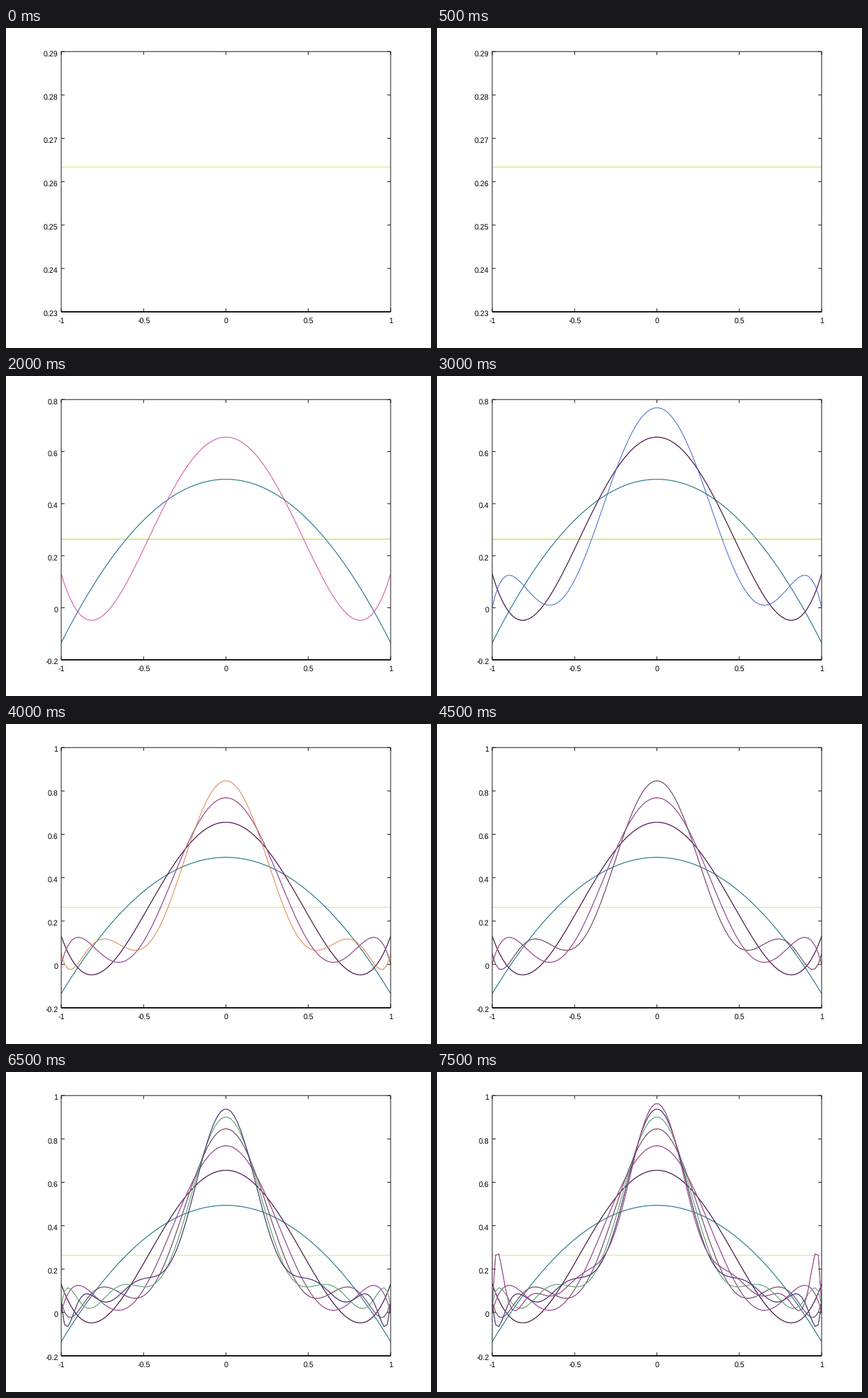
Animation of 600 by 451 pixels, one loop 8 s. Source, as a matplotlib script:

```python
import numpy as np
import matplotlib.pyplot as plt
from matplotlib.animation import FuncAnimation

# Least-squares polynomials of rising degree fitted to a bell-shaped function
W, H, DPI = 600, 451, 100
LEFT, TOP, WIDTH, HEIGHT = 78, 33.2, 465, 366.8
STEPS, INTERVAL = 16, 500
PX = 72 / DPI
TICK = 4.8
INK = "#1a1a1a"

LIME, PALE = "#d3df5e", "#e4e6bd"
COLORS = [
    LIME, PALE, "#52d68a", "#386d98", "#d0459c", "#2a1a38",
    "#3c5fc8", "#b9507f", "#d97f40", "#5f4a88", "#d0a04a", "#50b090",
    "#5a8fc0", "#4a2a5e", "#c06070", "#904a92",
]

nodes = np.linspace(-1, 1, 21)
samples = 1 / (1 + 25 * nodes**2)
xs = np.linspace(-1, 1, 100)
curves = [np.polynomial.Polynomial.fit(nodes, samples, d)(xs)
          for d in range(STEPS)]

plt.rcParams["font.family"] = "Liberation Sans"
plt.rcParams["text.hinting"] = "no_hinting"
fig = plt.figure(figsize=(W / DPI, H / DPI), dpi=DPI, facecolor="white")
ax = fig.add_axes([LEFT / W, 1 - (TOP + HEIGHT) / H, WIDTH / W, HEIGHT / H])


def y_axis(step):
    """Lower limit, upper limit and tick spacing."""
    if step < 2:
        return 0.23, 0.29, 0.01
    if step < 4:
        return -0.2, 0.5, 0.1
    if step < 8:
        return -0.2, 0.8, 0.2
    return -0.2, 1.0, 0.2


def rule(x, y):
    """Thin axis line; x and y in pixels from the lower left corner."""
    ax.plot(np.array(x) / WIDTH, np.array(y) / HEIGHT,
            transform=ax.transAxes, color=INK, lw=PX, snap=False,
            clip_on=False, solid_capstyle="butt", solid_joinstyle="miter")


def label(x, y, value, align):
    ax.text(x / WIDTH, y / HEIGHT, f"{value:g}", transform=ax.transAxes,
            ha=align, va="baseline", fontsize=10.6 * PX, color="black")


def draw_frame(lo, hi, gap):
    rule([0, WIDTH, WIDTH, 0, 0, WIDTH], [0, 0, HEIGHT, HEIGHT, 0, 0])
    for v in np.linspace(-1, 1, 5):
        x = (v + 1) / 2 * WIDTH
        rule([x, x], [0, TICK])
        rule([x, x], [HEIGHT - TICK, HEIGHT])
        label(x, -15.6, v, "center")
    count = round((hi - lo) / gap)
    for i in range(count + 1):
        y = i / count * HEIGHT
        rule([0, TICK], [y, y])
        rule([WIDTH - TICK, WIDTH], [y, y])
        label(-4.5, y - 6.2, round(lo + i * gap, 2), "right")


def draw(step):
    ax.clear()
    ax.axis("off")
    lo, hi, gap = y_axis(step)
    for degree in range(step + 1):
        color = COLORS[degree]
        if degree == 1 and 4 <= step < 8:
            color = LIME
        ax.plot(xs, curves[degree], color=color, lw=0.95 * PX, snap=False)
    draw_frame(lo, hi, gap)
    ax.set(xlim=(-1, 1), ylim=(lo, hi))
    return ax.get_children()


anim = FuncAnimation(fig, draw, frames=STEPS, interval=INTERVAL,
                     init_func=lambda: draw(0), repeat=True,
                     repeat_delay=0, blit=False)
plt.show()
```
